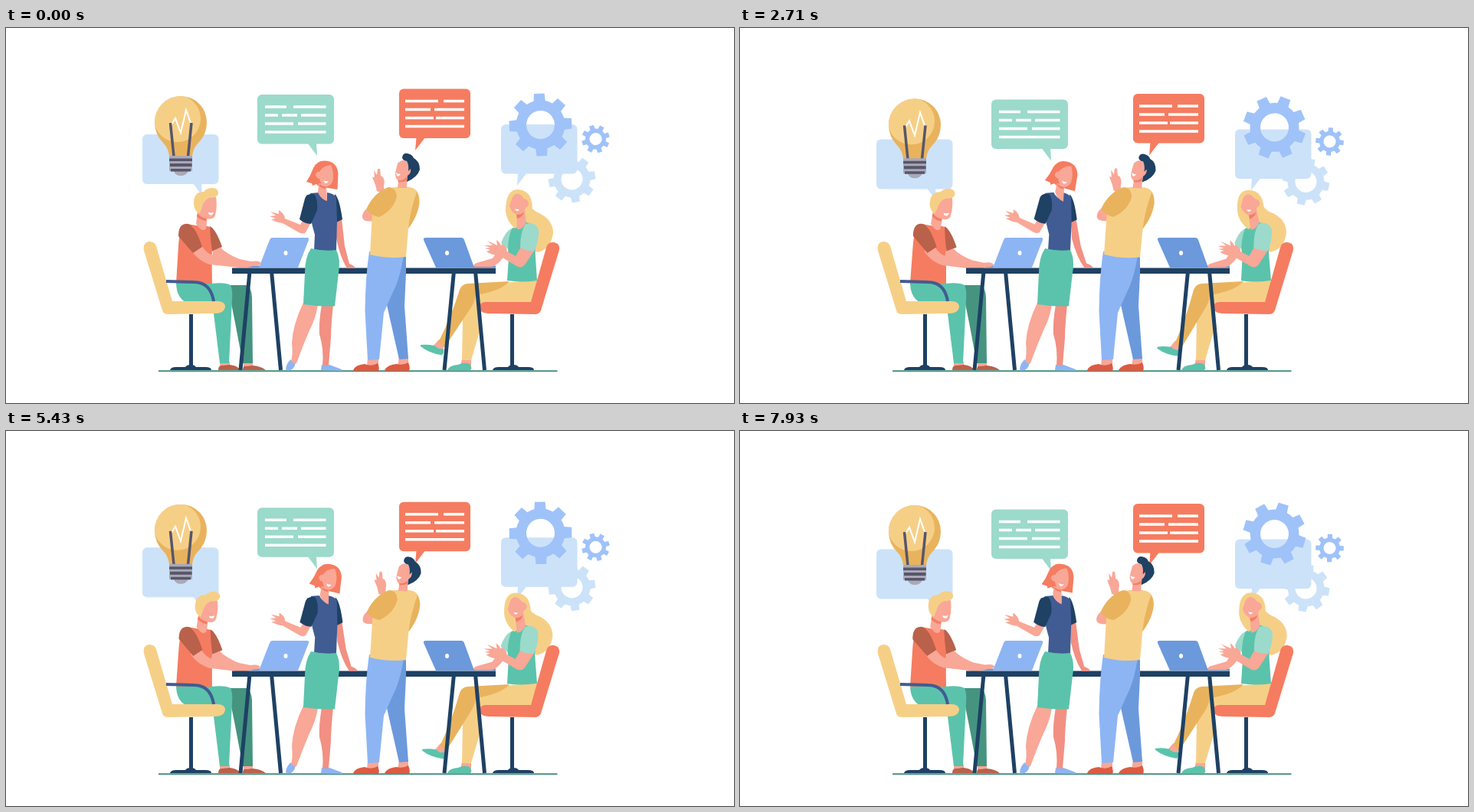
Animation of 950x490 px, one loop 8000 ms. Source, as an HTML page:

```html
<!DOCTYPE html>
<html lang="en">
<head>
<meta charset="utf-8">
<title>Team meeting</title>
<style>
@property --sway { syntax: "<number>"; inherits: true; initial-value: 0; }
@property --lift { syntax: "<number>"; inherits: true; initial-value: 0; }
@property --spin { syntax: "<angle>"; inherits: true; initial-value: 0deg; }
html, body { margin: 0; width: 100%; height: 100%; overflow: hidden; background: #fff; }
svg {
  display: block; width: 100%; height: 100%;
  animation: sway 8s linear infinite, lift 8s linear infinite, spin 8s linear infinite;
}
@keyframes sway { 0%, 89.58% { --sway: 0; } 44.79% { --sway: 1; } 100% { --sway: .2326; } }
@keyframes lift { 0% { --lift: 0; } 89.58% { --lift: 1; } 100% { --lift: .8837; } }
@keyframes spin { to { --spin: 201deg; } }

.bubble { transform: translateY(calc(var(--lift) * 17.4px)); }
.float { transform: translateY(calc(var(--lift) * 8.9px)); }
.gear { transform: translate(var(--at)) rotate(calc(var(--spin) + var(--from))); fill-rule: evenodd; }
.move {
  --x: 0; --y: 0; --r: 0;
  transform: translate(calc(var(--sway) * var(--x) * 1px), calc(var(--sway) * var(--y) * 1px))
    rotate(calc(var(--sway) * var(--r) * 1deg));
}
.cream { fill: #f6cf87; } .gold { fill: #e9b35d; }
.coral { fill: #f57c60; } .rust { fill: #b9614b; } .red { fill: #dc5b42; }
.teal { fill: #5bc3ab; } .pine { fill: #459480; } .mint { fill: #9cdacb; }
.navy { fill: #1e4164; } .indigo { fill: #405c92; }
.sky { fill: #8db5f3; } .blue { fill: #6b99dc; } .cog { fill: #9fc2f9; } .pale { fill: #cce2f9; }
.skin { fill: #f9a797; } .shade { fill: #f29083; }
.grey { fill: #aaa9b8; } .slate { fill: #57566a; } .white { fill: #fff; }
.line { fill: none; stroke: #fff; stroke-width: 3.5; }
.ink { fill: none; stroke: #1e4164; stroke-width: 5; }
</style>
</head>
<body>
<svg viewBox="0 0 950 490">
  <defs>
    <clipPath id="glass"><path d="M194 123A34 34 0 0 1 262 123Q262 139 251 150Q244 157 243 168H213Q212 157 205 150Q194 139 194 123Z"/></clipPath>
    <path id="base" d="M-27 447Q-26 443-19 443H-7Q-5 440 0 440T7 443H19Q27 443 27 447Z"/>
  </defs>

  <!-- speech bubbles, bulb and gears -->
  <g class="bubble pale"><rect x="178" y="139" width="99.5" height="65" rx="6"/><path d="M244 203H255L256 219Z"/></g>
  <g class="bubble">
    <g class="mint"><rect x="328" y="87" width="100" height="64.5" rx="6"/><path d="M394 151H405L406 167Z"/></g>
    <path class="line" d="M338 103H366M375 103H417.500M338 114H355M360 114H380M385 114H417.500M338 125H375M381 125H417.500M338 136H417.500"/>
  </g>
  <g class="bubble">
    <g class="coral"><rect x="513" y="79.500" width="93" height="64.500" rx="6"/><path d="M535.500 143H547L534 160Z"/></g>
    <path class="line" d="M521 95.500H564M571 95.500H598M521 106.500H554M559 106.500H598M521 117.500H558M561 117.500H598M521 128.500H598"/>
  </g>
  <g class="float"><path class="gear pale" data-size="31 24 14" style="--at: 738.500px, 197.500px; --from: -10deg"/></g>
  <g class="bubble pale"><rect x="646" y="126" width="99.500" height="64.500" rx="6"/><path d="M668 190H679L667 206Z"/></g>
  <g class="float">
    <path class="gear cog" data-size="41.300 32 18.500" style="--at: 697.500px, 126.500px; --from: -2.500deg"/>
    <path class="gear cog" data-size="18.500 13.500 8" style="--at: 769.500px, 145px; --from: -18deg"/>
  </g>
  <g class="float">
    <g clip-path="url(#glass)"><path class="gold" d="M190 85H265V170H190Z"/><circle class="cream" cx="223.500" cy="118.500" r="30.500"/></g>
    <path class="line" style="stroke-width:2" d="M216 126L221 118L228 137L235 107L241 124"/>
    <path class="line" style="stroke:#57566a" d="M214.500 124L219 168M242 124L237.500 168"/>
    <path class="grey" d="M213 167H243V187H238Q235 193 228 193T219 187H213Z"/>
    <path class="slate" d="M213 170.500H243V174H213ZM214 177H242.500V181H214ZM215 184H241V187.500H215Z"/>
  </g>

  <path class="line" style="stroke:#45917f;stroke-width:2" d="M199 448.300H719.500"/>

  <!-- laptops -->
  <path class="blue" d="M303 310.500H332V313H303ZM608 310.500H639V313H608Z"/>
  <path class="sky" d="M348 274H393Q396 274 395 277L381 313H330L344 277Q345 274 348 274Z"/>
  <path class="blue" d="M548 274H594Q597 274 598 277L611 313H561L545 277Q544 274 548 274Z"/>
  <g class="white"><ellipse cx="365" cy="294" rx="2.500" ry="3"/><ellipse cx="575.500" cy="294" rx="2.500" ry="3"/></g>

  <!-- seated man -->
  <path class="skin" d="M279 436H292V443H279ZM310 436H322V443H310Z"/>
  <path class="pine" d="M290 336H314Q320 338 321 352L322 438H309L299 385L294 360Z"/>
  <path class="rust" d="M277 447Q277 440 283 441L292 440Q300 441 303 444L309 447ZM309 447Q309 441 314 442L322 441Q333 442 339 447Z"/>
  <path class="teal" d="M222 332L268 334Q286 332 293 336Q296 342 295 355L291 438H279L271 373L238 360Q222 354 222 332Z"/>
  <g class="move" style="--r:1;transform-origin:245px 333px">
    <path class="coral" d="M236 256Q226 262 225 285L222 334H269L268.500 300L270 262Q263 257 254 259Z"/>
    <path class="rust" d="M266 259Q274 263 282 286L269 292L267 275Z"/>
    <g class="move" style="--x:-3;--y:1">
      <path class="skin" d="M270 291L280 287Q289 296 305 302L320 305Q332 303 333 308Q328 312 318 310L298 307Q280 303 269 299Z"/>
      <path class="skin" d="M242 291L255 284Q262 295 270 297L300 306Q317 306 326 309Q320 314 303 313L266 309Q252 305 242 291Z"/>
    </g>
    <path class="rust" d="M234 256Q225 257 225 272L244 294L256 286Q249 265 243 260Q239 255 234 256Z"/>
    <g class="move" style="--r:3.500;transform-origin:256px 255px">
      <path class="skin" d="M250 240L263 246L261 262Q256 268 248 256Z"/>
      <path class="coral" d="M250 242Q254 248 262 249L261 252Q253 251 249 246Z"/>
      <path class="skin" d="M254 224Q262 218 274 221Q276 234 273 245Q270 251 262 249Q252 245 252 236Z"/>
      <path class="cream" d="M245 229Q245 214 258 214Q262 209 270 209Q278 210 277 217Q275 222 265 222Q257 226 255 237L252 243Q245 238 245 229Z"/>
      <path class="white" d="M264 241Q268 242 271 240.500Q270 245 267 244.500T264 241Z"/>
    </g>
  </g>
  <path class="cream" d="M187 279Q194 279 196 285L217 357H276Q286 357 286 365Q284 373 273 373L212 374Q205 374 204 369L180 291Q178 280 187 279Z"/>
  <path class="line" style="stroke:#405c92;stroke-width:4" d="M209 331L245 332Q267 332 271 357"/>
  <path class="ink" d="M241.500 374V442M660.500 374V442"/>
  <use href="#base" class="navy" x="241"/><use href="#base" class="navy" x="662"/>

  <!-- seated woman -->
  <path class="skin" d="M595 432H607V442H593Z"/>
  <path class="teal" d="M576 447Q578 441 590 440Q598 436 605 439Q609 444 606 447Z"/>
  <path class="cream" d="M640 334L693 329Q692 350 684 359H640L621 363Q618 382 617 400L607 434H595L596 380L606 346Z"/>
  <g class="move" style="--r:-3.500;transform-origin:600px 343px">
    <path class="skin" d="M565 407L574 414L569 420L557 416Z"/>
    <path class="teal" d="M541 414Q550 413 559 415Q564 420 571 419Q572 424 569 427.500Q552 425 541 416Z"/>
    <path class="gold" d="M592 342Q596 333 606 336L613 349Q611 360 605 368L573 416L564 411Q580 380 592 342Z"/>
  </g>
  <path class="gold" d="M592 343Q594 335 602 334L657 331Q646 344 612 349Z"/>
  <g class="move" style="--r:-1.200;transform-origin:672px 330px">
    <path class="cream" d="M680 224Q684 238 698 243Q714 252 714 268Q711 290 693 293Q682 285 672 257Z"/>
    <path class="skin" d="M649 280L654 290Q646 308 634 312H611Q609 309 614 307L635 301Z"/>
    <path class="mint" d="M664 261Q653 262 646 281L655 289Q662 278 664 261Z"/>
    <path class="teal" d="M660 262L679 254Q693 256 693 270Q690 285 691 300L693 330Q672 333 654 330L656 300Q653 280 660 262Z"/>
    <g class="move" style="--r:-6;transform-origin:674px 256px">
      <path class="cream" d="M668 211Q683 212 686 227Q690 245 672 257L664 262Q653 252 652 239Q652 211 668 211Z"/>
      <path class="skin" d="M666 240L677 238L679 254Q674 264 667 263Z"/>
      <path class="coral" d="M666 243L676 241Q674 247 667 249Z"/>
      <path class="skin" d="M661 221Q668 211 676 223Q683 225 682 231Q680 234 678 235Q675 244 668 244Q659 242 657 232Z"/>
      <path class="white" d="M664 236.500L670 237Q668 240 666 239Z"/>
    </g>
    <path class="skin" d="M672 286L690 290L678 308Q673 315 666 311L643 297Q634 297 627 292L632 290L625 288L632 287L624 284L635 284L628 278L641 284L640 277Q646 281 647 288L665 298Z"/>
    <path class="mint" d="M678 256Q690 252 695 263Q696 275 690 291Q680 292 671 287Q671 266 678 256Z"/>
  </g>
  <path class="coral" d="M713 280Q723 280 722 290L698 369Q696 374 690 374L629 373Q618 372 618 365Q618 358 626 358H685L705 287Q707 280 713 280Z"/>

  <!-- table -->
  <path class="ink" d="M318 318L306 447M346.500 318L358.500 447M584.500 318L572 447M612.500 318L624.500 447"/>
  <path class="navy" d="M295 313.500H639V321H295Z"/>

  <!-- standing woman -->
  <path class="skin" d="M388 359L407 362Q404 380 396 395Q387 416 379 438L371 440Q375 426 373 412Q374 388 388 359Z"/>
  <path class="shade" d="M412 361H427Q424 390 424 405L421 441H413Q415 420 409 400Q408 385 412 361Z"/>
  <path class="sky" d="M365 446Q366 437 372 433Q374 440 378 437Q376 448 367 448ZM411 447L412 440Q417 442 422 440L438 446V448Z"/>
  <g class="move" style="--r:1.300;transform-origin:417px 290px">
    <g class="move" style="--r:-6;transform-origin:435px 252px"><path class="shade" d="M431 251L438 249L442 285L448 308Q455 311 456 314H445Q436 300 431 275Z"/></g>
    <path class="navy" d="M429 217Q435 222 439 250L431 254Z"/>
    <path class="skin" d="M387 252L398 254L391 267Q388 270 382 267L361 255Q352 254 346 250L352 249L344 246L352 245L345 240L356 243L356 238Q363 242 364 249L384 257Z"/>
    <path class="indigo" d="M397 216L408 215Q412 223 419 224V215Q427 216 431 221L432 252L431 291H402L403 270Q397 250 397 240Z"/>
    <path class="navy" d="M402 217Q392 216 390 223L383 250Q390 256 398 256L406 238Q407 222 402 217Z"/>
    <g class="move" style="--x:3;--r:7;transform-origin:412px 222px">
      <path class="coral" d="M416 173.500Q432 174 433.500 190L432.500 211L408 207L405 204L400 206L399 203L392 201Q398 192 401 183Q406 173 416 173.500Z"/>
      <path class="skin" d="M408 203L418 204L419 226Q411 224 407 215Z"/>
      <path class="coral" d="M409 204Q414 208 418 207L417 210Q411 209 409 206Z"/>
      <path class="skin" d="M409 188Q413 180 424 179Q429 190 426 201Q423 207 417 207Q410 204 409 197Q404 196 404 191Q406 187 409 188Z"/>
      <path class="white" d="M414 199Q418 201 421 200Q419 204 416 202.500Z"/>
    </g>
  </g>
  <path class="teal" d="M398 288Q415 292 431 290Q437 302 434 320L429 363.500Q406 364 388 361L390 320Q390 300 398 288Z"/>

  <!-- standing man -->
  <path class="skin" d="M472 431H486V442H471ZM513 430H525V442H511Z"/>
  <path class="red" d="M453 447Q456 440 468 439Q477 443 485 438Q488 444 486 448H454ZM494 447Q498 440 509 439Q519 441 525 437Q528 444 526 448H495Z"/>
  <path class="blue" d="M500 296H522V320L520 363L525 432L513 433L497 362Z"/>
  <path class="sky" d="M474 292L519 297Q514 328 505 345L493 372L487 433L472 434L468.500 370Q469 325 474 292Z"/>
  <g class="move" style="--r:1.200;transform-origin:498px 298px">
    <g class="move" style="--x:3;--y:-.5"><path class="skin" d="M484 213L482 205L478 195L481 195L480 186L484 192L485 184L488 184L489 193L492 195Q495 201 493 206L494 217Z"/></g>
    <path class="skin" d="M472 235Q464 241 465 248Q467 254 481 252L489 244Z"/>
    <path class="cream" d="M496 210Q512 206 527 208Q539 210 539 224Q538 240 525 262L522 299Q498 302 475 296L478 240Z"/>
    <path class="gold" d="M536 214Q541 222 539 232Q536 248 525 262Q527 240 536 214Z"/>
    <path class="gold" d="M499 208Q509 208 510 220Q506 238 487 247Q477 246 470 237Q480 215 499 208Z"/>
    <g class="move" style="--r:2.500;transform-origin:518px 207px">
      <path class="skin" d="M511 177Q517 170 524 175L530 190L523 197V209H511L512 200Q506 195 509 185Z"/>
      <path class="coral" d="M512 199Q518 200 523 195V199Q518 202 512 201Z"/>
      <path class="navy" d="M517 169Q518 163 524 164Q530 165 532 170Q540 174 540 185Q537 195 523 201L524 193Q529 190 528 184L525 187Q526 179 523 174Q517 173 517 169Z"/>
      <path class="white" d="M509 189Q512 191 515 191Q512 195 510 193Z"/>
    </g>
  </g>
</svg>
<script>
const TEETH = 8;

function gearPath([tip, root, hole]) {
  const point = (radius, angle) => `${radius * Math.cos(angle)} ${radius * Math.sin(angle)}`;
  let path = "";
  for (let i = 0; i < TEETH; i++) {
    const angle = i * 2 * Math.PI / TEETH;
    path += i ? `A${root} ${root} 0 0 1 ` : "M";
    path += `${point(root, angle - .24)}L${point(tip, angle - .165)}L${point(tip, angle + .165)}L${point(root, angle + .24)}`;
  }
  return `${path}ZM${hole} 0A${hole} ${hole} 0 1 0 ${-hole} 0A${hole} ${hole} 0 1 0 ${hole} 0Z`;
}

for (const gear of document.querySelectorAll(".gear")) {
  gear.setAttribute("d", gearPath(gear.dataset.size.split(" ").map(Number)));
}
</script>
</body>
</html>
```
